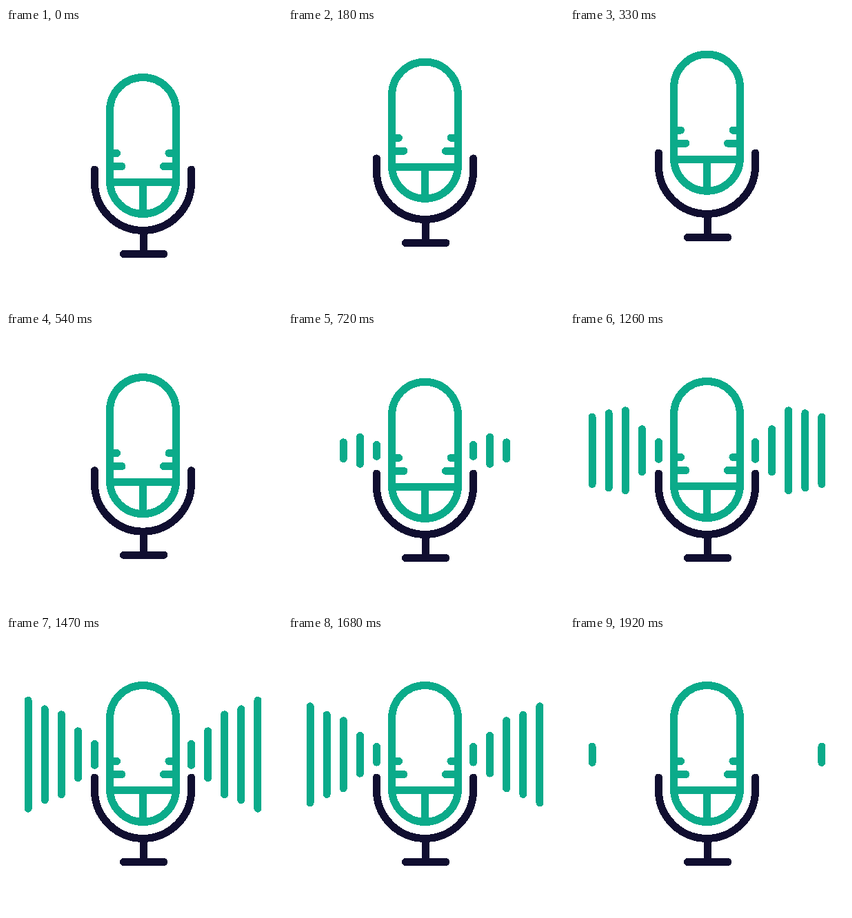
Animation, 400 px wide and 400 px high, one loop 3950 ms. Source, as an HTML page:

```html
<!DOCTYPE html>
<html lang="en">
<head>
<meta charset="utf-8">
<title>Microphone</title>
<style>
  html, body { margin: 0; width: 100%; height: 100%; overflow: hidden; background: #fff; }
  svg { display: block; width: 100%; height: 100%; shape-rendering: crispEdges; }
  path { fill: none; stroke: #0bab8a; stroke-width: 11; stroke-linecap: round; }
  #stand path { stroke: #100e30; }
</style>
</head>
<body>
<svg viewBox="0 0 400 400">
  <g id="stand">
    <path d="M128.4 205V223.3A70.1 70.1 0 0 0 268.6 223.3V205M199.4 293.5V327.5M170.5 327.5H229"/>
  </g>
  <g id="capsule">
    <path d="M150.5 119.5A48 48 0 0 1 246.5 119.5V221.5A48 48 0 0 1 150.5 221.5Z"/>
    <path d="M150.5 223.5H246.5M198.5 223.5V269"/>
    <path d="M150.5 181.5H160.5M246.5 181.5H236M150.5 200.5H168M246.5 200.5H228.5"/>
  </g>
  <path id="bars"/>
</svg>
<script>
const LOOP = 3950, STEP = 30, LAST_MOVE = 1920;
const WIDTH = 11, CENTER_X = 198.5, CENTER_Y = 171.8;

// Bar heights from the innermost pair outwards, before and after the swell.
const idleHeights = [28, 50, 35, 23, 29];
const peakHeights = [42, 79, 127, 143, 168];

const clamp = u => Math.min(1, Math.max(0, u));
const progress = (time, from, to) => clamp((time - from) / (to - from));
const ease = (time, from, to) => (1 - Math.cos(Math.PI * progress(time, from, to))) / 2;
const bump = (time, from, top, to) => ease(time, from, top) - ease(time, top, to);

const find = id => document.getElementById(id);
const shift = (id, y) => find(id).setAttribute("transform", `translate(0 ${y})`);

// Bars pop up outwards, swell from the middle one and collapse outwards.
function barHeight(i, time) {
  const birth = 560 + 50 * i;
  const idle = idleHeights[i] * ease(time, birth, birth + 45);
  const swell = ease(time, 1020, 1260 + 100 * Math.abs(i - 2));
  const fall = progress(time, 1438, 1850 + 27 * i) ** 3;
  return (idle + (peakHeights[i] - idle) * swell) * (1 - fall);
}

function barPair(i, time) {
  const length = barHeight(i, time) - WIDTH;
  if (length <= 0) return "";
  const offset = 70 + 24.1 * i, top = CENTER_Y - length / 2;
  return [CENTER_X - offset, CENTER_X + offset].map(x => `M${x} ${top}v${length}`).join("");
}

function draw(now) {
  const time = Math.min(LAST_MOVE, Math.floor((now % LOOP) / STEP) * STEP);
  const hop = bump(time, 0, 300, 630);
  shift("capsule", -34 * hop + 3 * bump(time, 540, 1040, 1240));
  shift("stand", -24.5 * hop);
  find("bars").setAttribute("d", peakHeights.map((_, i) => barPair(i, time)).join(""));
}

const start = performance.now();
function tick() {
  draw(performance.now() - start);
  requestAnimationFrame(tick);
}
tick();
</script>
</body>
</html>
```
